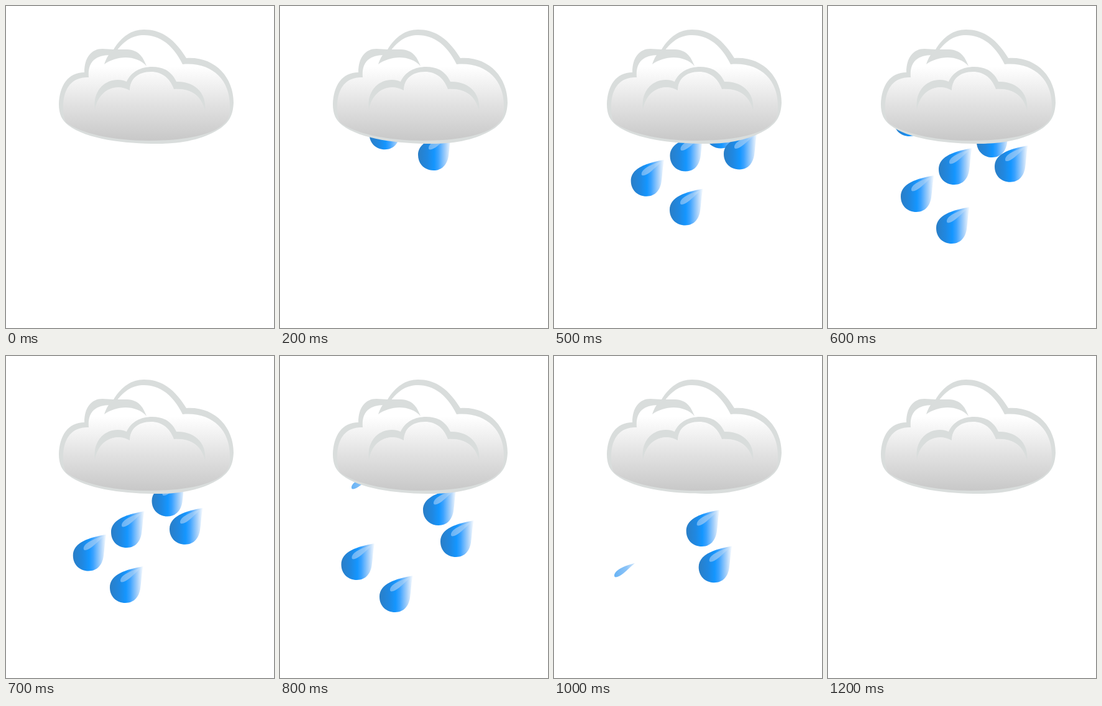
An HTML page for the animation above (1500 ms loop, 431 by 519 pixels).

```html
<!DOCTYPE html>
<html lang="en">
<head>
<meta charset="utf-8">
<title>Rain cloud</title>
<style>
  html, body { margin: 0; width: 100%; height: 100%; overflow: hidden; background: #fff; }
  svg { display: block; width: 431px; height: 519px; }
</style>
</head>
<body>
<svg viewBox="0 0 431 519">
  <defs>
    <linearGradient id="water">
      <stop offset="0" stop-color="#2a7ec6"/>
      <stop offset=".28" stop-color="#1f88e2"/>
      <stop offset=".48" stop-color="#1496ff"/>
      <stop offset=".6" stop-color="#3aa2ff"/>
      <stop offset=".82" stop-color="#a6d0fa"/>
      <stop offset="1" stop-color="#fff"/>
    </linearGradient>
    <linearGradient id="shine">
      <stop offset="0" stop-color="#68b3f5"/>
      <stop offset=".6" stop-color="#8cc4f8"/>
      <stop offset="1" stop-color="#d4e8fc"/>
    </linearGradient>
    <linearGradient id="fog" gradientUnits="userSpaceOnUse" x1="0" y1="98" x2="0" y2="217">
      <stop offset="0" stop-color="#fff"/>
      <stop offset=".5" stop-color="#e2e2e2"/>
      <stop offset="1" stop-color="#c8c8c8"/>
    </linearGradient>
    <!-- A drop's origin is its left edge and its bottom -->
    <path id="body" fill="url(#water)" d="M54-59C26-54 0-46 0-25C0-10 11 0 25 0C40 0 47-11 49-23C51-36 51-50 54-59Z"/>
    <path id="glint" fill="url(#shine)" d="M17-36C17-44 32-52 50-56C40-48 30-36 22-34C18-33 17-34 17-36Z"/>
  </defs>
  <g id="rain"></g>
  <g fill="#d9dddc">
    <path d="M85 158C86 128 100 107 126 107C126 82 138 69 155 69L173 70C186 49 202 38 222 38C252 38 272 55 290 84C335 81 366 114 366 156C365 175 360 186 345 197C320 214 285 222 245 222C190 222 130 215 100 192C90 184 85 175 85 158Z"/>
    <path fill="url(#fog)" d="M133 115C131 92 142 79 168 79L178 72C192 54 205 47 222 47C250 47 270 66 284 94C330 90 360 118 360 160C360 176 359 182 350 190C330 210 280 217 230 217C170 217 120 205 97 188C92 180 92 168 92 160C93 130 108 114 133 115Z"/>
    <path d="M158 94C161 84 166 76 173 70L195 70C213 71 220 81 226 97C214 83 192 80 174 86Q164 89 158 94Z"/>
    <path d="M143 168C139 138 157 119 180 119Q188 119 194 122C201 106 217 98 235 98C255 98 267 107 274 122C303 121 323 140 320 168C314 144 297 132 270 134C263 115 250 106 233 106C212 106 199 118 199 136C174 122 147 138 143 168Z"/>
  </g>
</svg>
<script>
// path: [ms, x, y] waypoints; hollow: time from which only the glint remains
const drops = [
  { path: [[0, 246, 206], [600, 174, 383], [800, 160, 413]] },
  { path: [[0, 157, 181], [600, 117, 332], [1000, 80, 390]], hollow: 1000 },
  { path: [[200, 212, 202], [600, 178, 288], [700, 169, 309]] },
  { path: [[500, 110, 190], [600, 106, 210], [800, 98, 248]], hollow: 700 },
  { path: [[400, 248, 215], [600, 239, 244], [800, 230, 273], [1100, 204, 324]] },
  { path: [[200, 288, 203], [800, 258, 324], [1100, 220, 386]] }
];
const rain = document.getElementById('rain');

for (const drop of drops) {
  drop.node = document.createElementNS('http://www.w3.org/2000/svg', 'g');
  drop.node.innerHTML = '<use href="#body"/><use href="#glint"/>';
  rain.append(drop.node);
}

function place({ path, hollow = Infinity, node }, t) {
  const next = path.findIndex(([time], i) => i && t <= time);
  const visible = next > 0 && t >= path[0][0];
  node.style.display = visible ? '' : 'none';
  if (!visible) return;
  const [t0, x0, y0] = path[next - 1], [t1, x1, y1] = path[next];
  const k = (t - t0) / (t1 - t0);
  node.setAttribute('transform', `translate(${x0 + (x1 - x0) * k} ${y0 + (y1 - y0) * k})`);
  node.firstChild.style.display = t < hollow ? '' : 'none';
}

const start = performance.now();
function draw() {
  const t = Math.floor((performance.now() - start) % 1500 / 100) * 100;
  for (const drop of drops) place(drop, t);
  requestAnimationFrame(draw);
}
draw();
</script>
</body>
</html>
```
